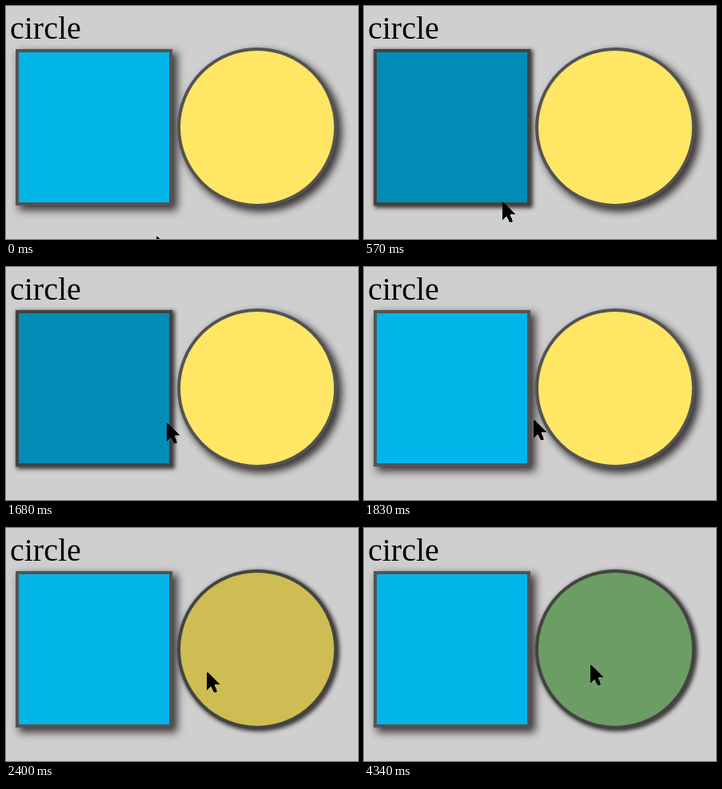
Animation, 440 px wide and 292 px high, one loop 6370 ms. Source, as an HTML page:

```html
<!DOCTYPE html>
<html lang="en">
<head>
<meta charset="utf-8">
<title>Hover shapes</title>
<style>
html, body { margin: 0; width: 100%; height: 100%; overflow: hidden; background: #cfcfcf; }
p { position: absolute; left: 5px; top: 5px; margin: 0; font: 40px/46px "Liberation Serif", "Times New Roman", serif; color: #000; }
.shape { position: absolute; box-sizing: border-box; border: 4px solid #535353; box-shadow: 5px 5px 10px 1px #3c3639; }
.shape.hover { border-color: #434341; box-shadow: 2px 2px 5px 1px #3c3639; }
#square { left: 12px; top: 54px; width: 196px; height: 196px; background: #02b5e9; }
#square.hover { background: #028cb6; }
#circle { left: 214px; top: 52px; width: 200px; height: 200px; border-radius: 50%; background: #ffe664; }
#circle.hover { background: #cdbd52; }
#circle.clicked { background: #6b9d65; }
svg { position: absolute; left: 0; top: 0; }
</style>
</head>
<body>
<p>circle</p>
<div class="shape" id="square"></div>
<div class="shape" id="circle"></div>
<svg id="cursor" width="16" height="26" shape-rendering="crispEdges">
  <path d="M0 0H1L16 15H9.5L13 24L9 25.5L5 17.5L0 22Z"/>
</svg>
<script>
const LOOP = 6370, STEP = 30, TURN = 840, STOP = 3240, CLICK = 4340;
const square = document.getElementById('square');
const circle = document.getElementById('circle');
const cursor = document.getElementById('cursor');

const mix = (a, b, k) => a + (b - a) * k;
const smooth = u => u * u * (3 - 2 * u);
const bezier = (a, b, c, d, s) =>
  a * (1 - s) ** 3 + 3 * b * s * (1 - s) ** 2 + 3 * c * s * s * (1 - s) + d * s ** 3;

// The pointer drifts left, turns, then swings right while its climb slows down
function pointerAt(time) {
  const t = Math.min(Math.floor(time / STEP) * STEP, STOP);
  const x = t < TURN
    ? mix(169.5, 187.5, (1 - t / TURN) ** 1.5)
    : mix(169.5, 283, smooth((t - TURN) / (STOP - TURN)));
  const y = bezier(289, 194, 180.7, 172, t / STOP);
  return [Math.round(x), Math.round(y)];
}

function draw(t) {
  const [x, y] = pointerAt(t);
  cursor.style.transform = `translate(${x}px, ${y}px)`;
  square.classList.toggle('hover', x >= 12 && x < 208 && y >= 54 && y < 250);
  circle.classList.toggle('hover', Math.hypot(x - 314, y - 152) < 96);
  circle.classList.toggle('clicked', t >= CLICK);
}

const start = performance.now();
function frame() {
  draw((performance.now() - start) % LOOP);
  requestAnimationFrame(frame);
}
frame();
</script>
</body>
</html>
```
